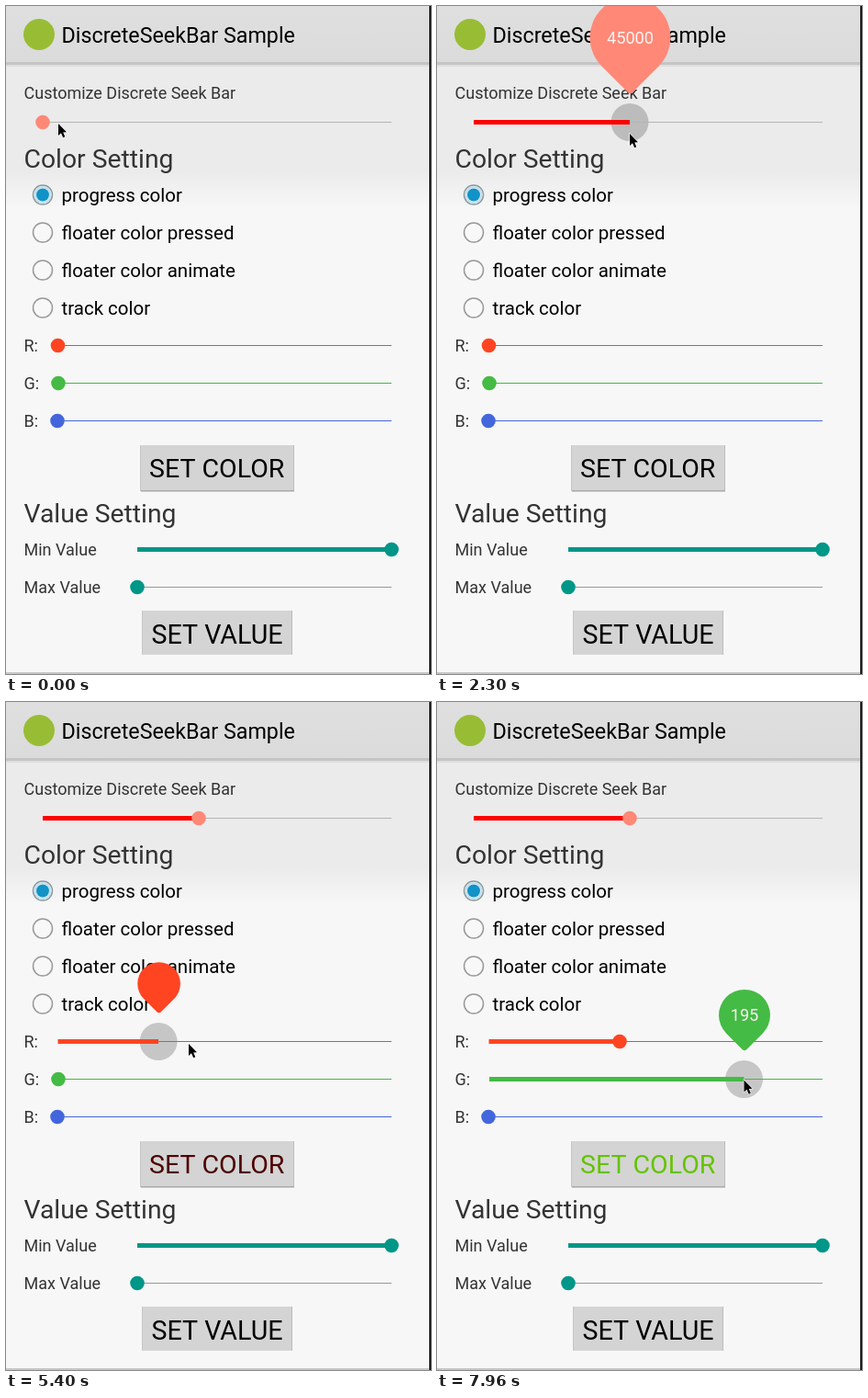
Animation of 463 by 727 pixels, one loop 8 s. Source, as an HTML page with a canvas:

```html
<!DOCTYPE html>
<html lang="en">
<head>
<meta charset="utf-8">
<title>DiscreteSeekBar Sample</title>
<style>
html, body { margin: 0; width: 100%; height: 100%; overflow: hidden; background: #f7f7f7; }
canvas { display: block; }
</style>
</head>
<body>
<canvas id="stage" width="463" height="727"></canvas>
<script>
const ctx = document.getElementById('stage').getContext('2d');
const LOOP = 8000, STEP = 137.4;   // the screen refreshes once per step
const END = 420, LEFT = 19.5, ROW = 41;
const RED = '#ff4422', GREEN = '#44bb44', BLUE = '#4466dd', TEAL = '#009688';
const INK = '#333';

const clamp = v => Math.max(0, Math.min(1, v));
const mix = (a, b, u) => a + (b - a) * u;

// Linear motion through points [step, ...values]
function along(points, n) {
  const k = points.findIndex(p => p[0] >= n);
  if (k <= 0) return points[k < 0 ? points.length - 1 : 0].slice(1);
  const p = points[k - 1], q = points[k];
  return p.slice(1).map((v, i) => mix(v, q[i + 1], (n - p[0]) / (q[0] - p[0])));
}

class Bar {
  constructor(y, from, color, options = {}) {
    Object.assign(this, { y, from, line: color, fill: color, knob: color, path: [[0, from]] }, options);
  }
  x(n) { return along(this.path, n)[0]; }
  part(n) { return (this.x(n) - this.from) / (END - this.from); }
  held(n) { return n >= this.press && n < this.release; }
  byte(n) { return Math.round(255 * this.part(n)); }
  label(n) { return this.byte(n); }
}

const main = new Bar(126.5, 40, '#ff0000', {
  line: '#b4b4b4', knob: '#ff8877', size: 44, grip: 12.5, press: 5, release: 18,
  path: [[5, 40], [14.8, 210]],
  label(n) { return Math.floor(this.part(n) * 1000 + 3) * 100; }
});
const red = new Bar(369.5, 56.5, RED, {
  size: 28, grip: 2.5, press: 36.5, release: 43, path: [[36, 56.5], [39.9, 199]]
});
const green = new Bar(369.5 + ROW, 57, GREEN, {
  size: 28, grip: 1, press: 48.9, release: 99, path: [[48.5, 57], [52, 230.5], [57.5, 334.5]]
});
const bars = [
  main, red, green,
  new Bar(369.5 + 2 * ROW, 56, BLUE),
  new Bar(591.5, 143, TEAL, { path: [[0, END]] }),
  new Bar(591.5 + ROW, 143, TEAL, { line: '#999' })
];
const draggable = [main, red, green];

// Where the pointer goes while nothing is dragged
const glide = [
  [0, 57, 128], [3, 41, 128], [20, 210, 139], [21, 262, 411], [23, 267, 476], [27, 212, 427],
  [28, 212, 427], [31, 187, 424], [35, 37, 352], [36, 54, 367], [43, 198, 372], [47, 58, 409]
];

function pointer(n) {
  const bar = draggable.find(b => b.held(n));
  if (bar) return [bar.x(n + 1), bar.y + bar.grip];
  if (n < main.press) return along(glide.slice(0, 2), n);
  return along(glide.slice(2), n);
}

function rect(x, y, w, h, color) {
  ctx.fillStyle = color;
  ctx.fillRect(x, y, w, h);
}

function disc(x, y, r, color) {
  ctx.fillStyle = color;
  ctx.beginPath();
  ctx.arc(x, y, r, 0, 7);
  ctx.fill();
}

function ring(x, y, r, width, color) {
  ctx.strokeStyle = color;
  ctx.lineWidth = width;
  ctx.beginPath();
  ctx.arc(x, y, r, 0, 7);
  ctx.stroke();
}

function text(s, x, y, size, color = '#000', align = 'left') {
  ctx.font = size + 'px Roboto, sans-serif';
  ctx.textAlign = align;
  ctx.fillStyle = color;
  ctx.fillText(s, x, y);
}

function gradient(y0, y1, c0, c1) {
  const g = ctx.createLinearGradient(0, y0, 0, y1);
  g.addColorStop(0, c0);
  g.addColorStop(1, c1);
  return g;
}

function radio(y, on) {
  disc(40, y, 11, '#f8f8f8');
  ring(40, y, 10.5, 1.5, on ? '#8a9aa0' : '#999');
  if (!on) return;
  ring(40, y, 8.5, 2, '#c3dfea');
  disc(40, y, 7, '#1193c8');
}

function button(x, y, w, h) {
  rect(x, y, w, h, '#d4d4d4');
  rect(x, y, 1, h, '#c6c6c6');
  rect(x + w - 1, y, 1, h, '#bcbcbc');
}

function background() {
  rect(0, 0, 463, 727, '#f7f7f7');
  rect(0, 64, 463, 156, gradient(180, 220, '#ebebeb', '#f7f7f7'));
  rect(0, 0, 463, 62, gradient(0, 62, '#dfdfdf', '#dbdbdb'));
  rect(0, 61, 463, 3, '#c5c5c5');
  rect(0, 64, 463, 2, '#dedede');
  disc(36, 31, 17, '#98bd35');
}

function labels(n) {
  text('DiscreteSeekBar Sample', 60.5, 40, 23.3);
  text('Customize Discrete Seek Bar', LEFT, 101, 18, INK);
  text('Color Setting', LEFT, 176, 28.3, INK);
  ['progress color', 'floater color pressed', 'floater color animate', 'track color'].forEach((s, i) => {
    radio(205.5 + ROW * i, i === 0);
    text(s, 60.5, 213 + ROW * i, 20.5);
  });
  ['R:', 'G:', 'B:'].forEach((s, i) => text(s, LEFT, 376 + ROW * i, 18, INK));
  button(146, 478, 168, 50);
  rect(147, 527, 167, 1.5, '#a8a8a8');
  text('SET COLOR', 229.7, 513, 28.5, `rgb(${red.byte(n)},${green.byte(n)},0)`, 'center');
  text('Value Setting', LEFT, 562, 28.3, INK);
  ['Min Value', 'Max Value'].forEach((s, i) => text(s, LEFT, 598 + ROW * i, 18, INK));
  button(148, 658, 164, 48);
  text('SET VALUE', 230, 694, 28.6, '#000', 'center');
}

function seekBar(bar, n) {
  const x = bar.x(n), held = bar.held(n);
  if (held) disc(x, bar.y, 20.5, 'rgba(0,0,0,0.2)');
  rect(x, bar.y - 0.5, END - x, 1, bar.line);
  rect(bar.from, bar.y - 2.5, x - bar.from, 5, bar.fill);
  if (!held) disc(x, bar.y, 7.8, bar.knob);
}

// Drop-shaped bubble that grows out of the knob and shrinks back
function floater(bar, n) {
  const age = n - bar.press;
  const scale = clamp(age / 3) * (1 - clamp((n - bar.release) / 2));
  if (scale <= 0) return;
  const x = bar.x(n) + 0.5, r = bar.size * scale, d = r * Math.SQRT1_2;
  const tip = bar.y - 30 * Math.min(1, scale * 1.25);
  const cy = tip - 2 * d;
  ctx.fillStyle = bar.knob;
  ctx.beginPath();
  ctx.arc(x, cy, r, Math.PI * 0.75, Math.PI * 0.25);
  ctx.lineTo(x + 2, tip - 2);
  ctx.quadraticCurveTo(x, tip - 0.5, x - 2, tip - 2);
  ctx.lineTo(x - d, cy + d);
  ctx.fill();
  if (age > 3.3 && bar.held(n)) text(bar.label(n), x, cy + 6.5, 18.2, '#fbf3f1', 'center');
}

function cursor([x, y]) {
  ctx.beginPath();
  ctx.moveTo(x, y);
  ctx.lineTo(x, y + 13);
  ctx.lineTo(x + 3, y + 10.3);
  ctx.lineTo(x + 5.2, y + 15.2);
  ctx.lineTo(x + 7.3, y + 14.3);
  ctx.lineTo(x + 5.2, y + 9.5);
  ctx.lineTo(x + 9, y + 9.2);
  ctx.closePath();
  ctx.strokeStyle = 'rgba(255,255,255,0.9)';
  ctx.lineWidth = 1.2;
  ctx.stroke();
  ctx.fillStyle = '#000';
  ctx.fill();
}

function draw(time) {
  const n = Math.floor((time % LOOP + 30) / STEP);
  background();
  labels(n);
  bars.forEach(b => seekBar(b, n));
  draggable.forEach(b => floater(b, n));
  rect(0, 725.5, 463, 1, '#999');
  rect(461, 0, 2, 727, '#1c1c1c');
  cursor(pointer(n));
}

const start = performance.now();
function tick() {
  draw(Math.max(0, performance.now() - start));
  requestAnimationFrame(tick);
}
tick();
</script>
</body>
</html>
```
